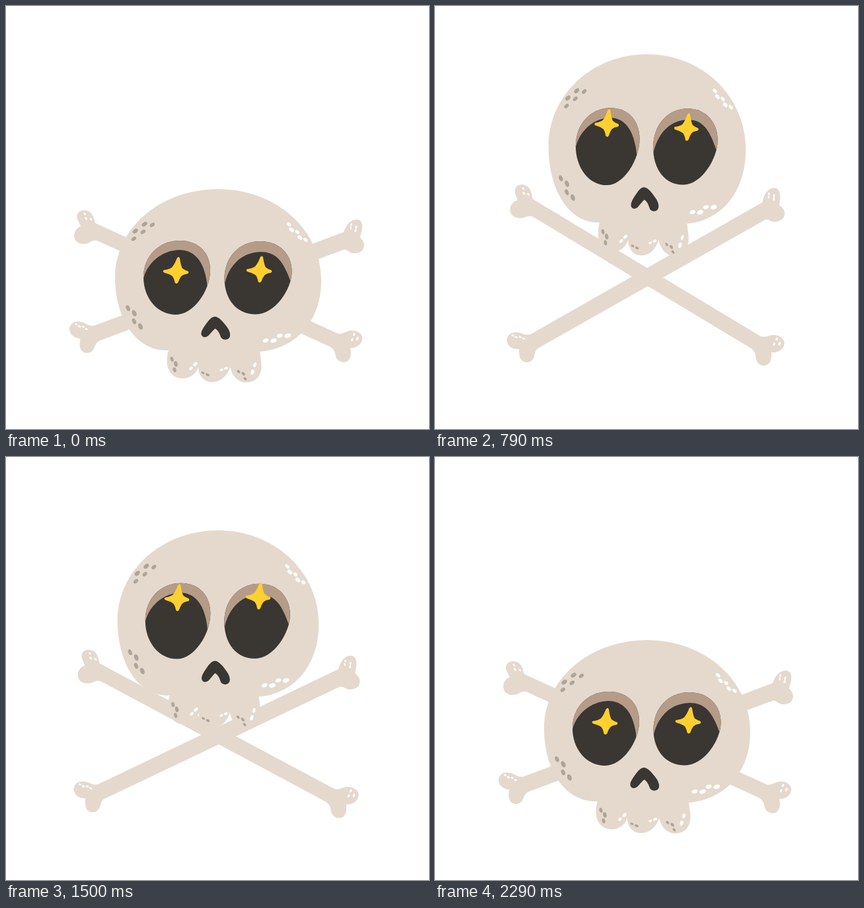
Animation of 640 by 640 pixels, one loop 6 s. Source, as an HTML page with a canvas:

```html
<!DOCTYPE html>
<html lang="en">
<head>
<meta charset="utf-8">
<title>Jumping skull</title>
<style>
  html, body { margin: 0; width: 100%; height: 100%; overflow: hidden; background: #fff; }
  canvas { display: block; width: 640px; height: 640px; }
</style>
</head>
<body>
<canvas id="stage" width="640" height="640"></canvas>
<script>
const ctx = document.getElementById('stage').getContext('2d');
const LOOP = 6000, FPS = 14, LAST = 32, CENTER = 321, FLOOR = 569.5;
const BONE = '#e5d9cd', DARK = '#3a3632', BROWN = '#b59c88', GOLD = '#ffd02f', GRAY = '#aea499', WHITE = '#fff';

// Shapes are drawn in the resting pose.
const skull = new Path2D(`M321 277 C408 277 477 338 477 415 C477 475 441 518 384 523
  C385 530 386.5 538 386.5 545 C386.5 560 377 569.5 364 569.5 C351 569.5 342 560 339 546
  C336 558 326 569 311.5 569 C298 569 291 558 291 546 C288 556 279 563.5 267 563.5
  C253 563.5 243.5 552 243.5 537 C243.5 531 244 526 246 521 C195 523 165 470 165 411 C165 336 234 277 321 277Z`);
const nose = new Path2D(`M316 470 C322 470 329 478 336 488 C340 495 340 500 337 503 C333 506 327 505 325 501
  C323 495 321 491 316.5 488 C313 491 309 496 306 499 C302 502 297 502 295.5 497
  C295 493 297 489 302 482 C307 475 311 470 316 470Z`);
const star = new Path2D(`M258.5 382 Q261.5 377.5 263 382 Q264.5 393 267 397 Q271 400 275 401 Q277.5 403 275 405
  Q268 406 265 409 Q262 413 260.5 418 Q258 421.5 255.5 418.5 Q254.5 412 251.5 408.5
  Q246 405 239.5 403.5 Q236 401.5 239 399.5 Q246 399 251 395.5 Q255 391 258.5 382Z`);
const eyes = [
  { ball: new Path2D('M208 410C208 378 232 355 263 355C292 355 309 374 309 400C309 430 284 467 257 467C229 467 208 442 208 410Z'),
    lid: new Path2D('M200 412L208 412C214 389 235 370 262 369C284 369 297 385 302 408C304 416 305 424 304 430L320 430V340H200Z') },
  { ball: new Path2D('M330.5 412C330.5 380 353 356 385 356C414 356 432.5 376 432.5 402C432.5 428 407 466.5 378 466.5C349 466.5 330.5 444 330.5 412Z'),
    lid: new Path2D('M320 420L331 420C336 398 352 373 385 372C408 372 419 385 430 415L440 415V340H320Z') }
];
const bones = [
  { x: 317, y: 425, turn: 1,
    path: new Path2D(`M135 328.5 C133 320 130 309 118 309 C108 309 105 318 109 325 L113 333
      C104 337 101 347 105 354 C110 362 122 361 128 357 C132 354.5 136 354 140 356 L488 514.5
      C495 518 497 522 498 526 C499 534 504 539 511 539 C519 539 524 531 521 517.5
      C530 518 539 512 539 502 C538 494 530 491 522 491 C514 491.5 511 497 502 495.5Z`),
    spots() {
      patch(WHITE, 3, 118, 316, 127, 324, 2.5, -2);
      patch(WHITE, 3, 530, 498, 527, 506, 2.8, 3.5);
    } },
  { x: 324, y: 426.5, turn: -1.37,
    path: new Path2D(`M511 342 C514 333 520 323 531 323 C540 324 541 333 537 345 L535.5 350
      C542 356 544 363 539 370 C532 376 523 375 518 371 C515 369 513 368 510 369 L144 505.5
      C137 507 136 512 133.5 517 C131 524 125 526 119 524.5 C112 522 110 515 112.5 503
      C102 503 96 496 96 488 C98 478 106 476 114 478 C122 480 124 485 134 483.5Z`),
    spots() {
      patch(WHITE, 4, 526.5, 331.5, 525, 339, 2.5, 4);
      patch(WHITE, 4, 106, 482, 122, 488, 2.4, -0.7);
    } }
];

const sway = n => u => u ** n / (u ** n + (1 - u) ** n);
const speedUp = n => u => u ** n;
const slowDown = n => u => 1 - (1 - u) ** n;

// Moves are [first step, last step, goal, easing]: crouch, leap, fall, settle.
const pose = [[0, 7, -1, sway(2)], [7, 13.6, 0.94, sway(4.5)], [13.6, 25, -1, speedUp(2.9)], [25, 32, 0, slowDown(5.2)]];
const boneDrop = [[0, 7, 49.5, sway(2)], [7, 13.6, -26, sway(4.5)], [13.6, 25, 48, speedUp(2.9)], [25, 32, 0, slowDown(5.2)]];
const skullDrop = [[0, 7, 24.5, sway(2)], [7, 13.2, -221.5, sway(3.3)], [13.2, 25.4, 17.5, speedUp(3)], [26, 32, 0, slowDown(5)]];
const starDrop = [[0, 7, 13.5, sway(2)], [7, 14.2, -35, sway(5)], [14.2, 25.5, 13, speedUp(2.8)], [25.5, 32, 0, slowDown(2)]];

function at(moves, k) {
  let value = 0;
  for (const [first, last, goal, ease] of moves) {
    const u = Math.min(1, Math.max(0, (k - first) / (last - first)));
    if (u < 1) return value + (goal - value) * ease(u);
    value = goal;
  }
  return value;
}

// A zigzag row of oval spots along a line.
function patch(color, n, x0, y0, x1, y1, r, side) {
  const angle = Math.atan2(y1 - y0, x1 - x0);
  ctx.fillStyle = color;
  for (let i = 0; i < n; i++) {
    const u = i / (n - 1), off = i % 2 ? side : -side;
    const size = r * (i % 2 ? 1 : 0.9);
    ctx.beginPath();
    ctx.ellipse(x0 + (x1 - x0) * u + off * Math.sin(angle), y0 + (y1 - y0) * u - off * Math.cos(angle),
      size, size * 0.64, angle, 0, 2 * Math.PI);
    ctx.fill();
  }
}

function skullSpots() {
  patch(GRAY, 5, 191, 349, 219, 328, 4.6, 4);
  patch(GRAY, 4, 187, 456, 201, 486, 5, 2.7);
  patch(GRAY, 3, 253, 534, 257, 550, 4.2, 2);
  patch(GRAY, 2, 298, 555, 305, 558, 3, 0);
  patch(GRAY, 3, 353, 552, 363, 563, 3.2, 1.5);
  patch(WHITE, 5, 427, 331.5, 452, 355, 4.2, -1.7);
  patch(WHITE, 4, 393.5, 508, 425.5, 497, 5, -2);
  patch(WHITE, 2, 280, 548, 286.5, 542, 3.6, 0);
  patch(WHITE, 2, 326, 550.5, 333, 548, 3, 0);
  patch(WHITE, 2, 376.5, 543, 373, 554, 4, 0);
}

function fill(path, color) {
  ctx.fillStyle = color;
  ctx.fill(path);
}

function drawBone(bone, k) {
  ctx.save();
  ctx.translate(bone.x, bone.y + at(boneDrop, k));
  ctx.rotate(at(pose, k) * bone.turn * 9.5 * Math.PI / 180);
  ctx.translate(-bone.x, -bone.y);
  fill(bone.path, BONE);
  bone.spots();
  ctx.restore();
}

function drawEye(eye) {
  fill(eye.ball, DARK);
  ctx.save();
  ctx.clip(eye.ball);
  fill(eye.lid, BROWN);
  ctx.restore();
}

// The right star trails the left one slightly.
function drawStar(i, k) {
  ctx.save();
  ctx.translate(126 * i, at(starDrop, k - 0.25 * i) - 1.4 * i);
  fill(star, GOLD);
  ctx.restore();
}

function drawSkull(k) {
  const squash = -0.062 * at(pose, k);
  ctx.save();
  ctx.translate(CENTER, FLOOR + at(skullDrop, k));
  ctx.scale(1 + squash, 1 - squash);
  ctx.translate(-CENTER, -FLOOR);
  fill(skull, BONE);
  skullSpots();
  eyes.forEach(drawEye);
  fill(nose, DARK);
  drawStar(0, k);
  drawStar(1, k);
  ctx.restore();
}

function draw(ms) {
  const k = Math.min(LAST, Math.floor((ms + 5) * FPS / 1000));
  ctx.fillStyle = WHITE;
  ctx.fillRect(0, 0, 640, 640);
  bones.forEach(bone => drawBone(bone, k));
  drawSkull(k);
}

const start = performance.now();
function tick() {
  draw((performance.now() - start) % LOOP);
  requestAnimationFrame(tick);
}
tick();
</script>
</body>
</html>
```
